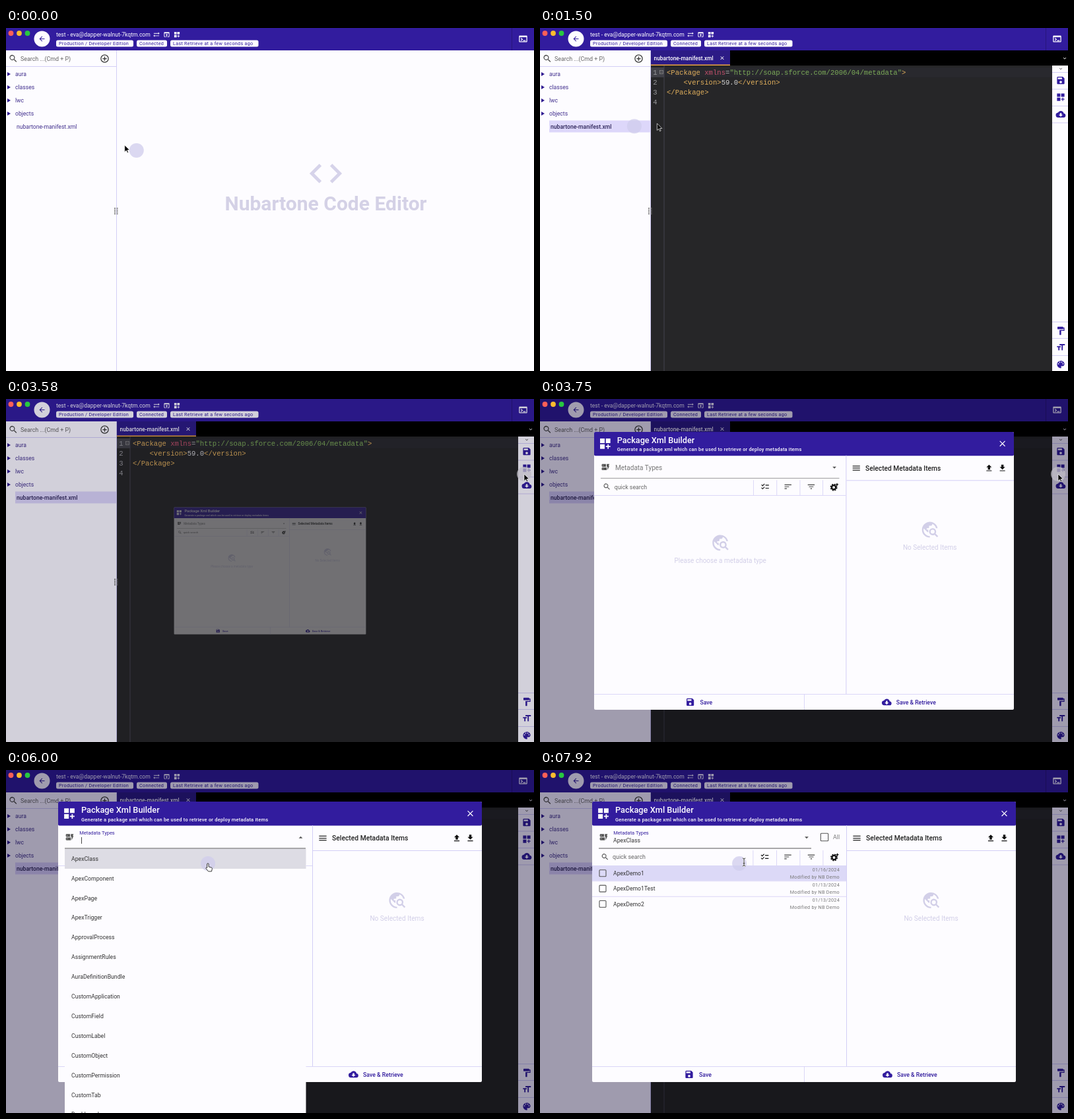
An HTML page for the animation above (8000 ms loop, 800 px wide and 521 px high).

```html
<!DOCTYPE html>
<html lang="en">
<head>
<meta charset="utf-8">
<title>Code editor</title>
<style>
html, body { margin: 0; width: 100%; height: 100%; overflow: hidden; background: #fdfcff; }
svg { display: block; width: 100%; height: 100%; }
text { font-family: Roboto, sans-serif; white-space: pre; }
.mono { font-family: "Liberation Mono", monospace; }
#dim { mix-blend-mode: multiply; }
</style>
</head>
<body>
<svg id="stage" viewBox="0 0 800 521"></svg>
<script>
const PURPLE = '#321c9e', LINE = '#d3cef6', PALE = '#d2cfe8', WHITE = '#fdfcff';

const ICONS = {
  back: 'M20 11H7.83l5.59-5.59L12 4l-8 8 8 8 1.41-1.41L7.83 13H20z',
  swap: 'M22 8l-4-4v3H3v2h15v3zM2 16l4 4v-3h15v-2H6v-3z',
  open: 'M19 4H5c-1.1 0-2 .9-2 2v12c0 1.1.9 2 2 2h4v-2H5V8h14v10h-4v2h4c1.1 0 2-.9 2-2V6c0-1.1-.9-2-2-2zm-7 6l-4 4h3v6h2v-6h3z',
  widgets: 'M3 11h8V3H3zM3 21h8v-8H3zM13 3v8h8V3zM18 13h-2v3h-3v2h3v3h2v-3h3v-2h-3z',
  term: 'M20 4H4c-1.1 0-2 .9-2 2v12c0 1.1.9 2 2 2h16c1.1 0 2-.9 2-2V6c0-1.1-.9-2-2-2zm0 14H4V8h16zm-2-1h-6v-2h6zM7.5 17l-1.4-1.4L8.7 13l-2.6-2.6L7.5 9l4 4z',
  search: 'M15.5 14h-.8l-.3-.3A6.5 6.5 0 1 0 13.7 14.4l.3.3v.8l5 5 1.5-1.5zm-6 0a4.5 4.5 0 1 1 0-9 4.5 4.5 0 0 1 0 9z',
  add: 'M13 7h-2v4H7v2h4v4h2v-4h4v-2h-4zM12 2a10 10 0 1 0 0 20 10 10 0 0 0 0-20zm0 18a8 8 0 1 1 0-16 8 8 0 0 1 0 16z',
  code: 'M9.4 16.6L4.8 12l4.6-4.6L8 6l-6 6 6 6zm5.2 0l4.6-4.6-4.6-4.6L16 6l6 6-6 6z',
  save: 'M17 3H5a2 2 0 0 0-2 2v14c0 1.1.9 2 2 2h14c1.1 0 2-.9 2-2V7zm-5 16a3 3 0 1 1 0-6 3 3 0 0 1 0 6zm3-10H5V5h10z',
  cloud: 'M19.35 10.04A7.5 7.5 0 0 0 5.35 8.04 6 6 0 0 0 6 20h13a5 5 0 0 0 .35-9.96zM17 13l-5 5-5-5h3V9h4v4z',
  paint: 'M18 4V3c0-.5-.5-1-1-1H5c-.5 0-1 .5-1 1v4c0 .5.5 1 1 1h12c.5 0 1-.5 1-1V6h1v4H9v11c0 .5.5 1 1 1h2c.5 0 1-.5 1-1v-9h8V4z',
  size: 'M9 4v3h5v12h3V7h5V4zm-6 8h3v7h3v-7h3V9H3z',
  palette: 'M12 3a9 9 0 0 0 0 18c.8 0 1.5-.7 1.5-1.5 0-1-.8-1.2-.8-2 0-.8.7-1.5 1.5-1.5H16c2.8 0 5-2.2 5-5 0-4.4-4-8-9-8zM6.5 12a1.5 1.5 0 1 1 0-3 1.5 1.5 0 0 1 0 3zm3-4a1.5 1.5 0 1 1 0-3 1.5 1.5 0 0 1 0 3zm5 0a1.5 1.5 0 1 1 0-3 1.5 1.5 0 0 1 0 3zm3 4a1.5 1.5 0 1 1 0-3 1.5 1.5 0 0 1 0 3z',
  check: 'M22 7h-9v2h9zm0 8h-9v2h9zM5.5 11L2 7.5 3.4 6l2.1 2.2 4.3-4.3 1.4 1.4zm0 8L2 15.5 3.4 14l2.1 2.2 4.3-4.3 1.4 1.4z',
  sort: 'M3 18h6v-2H3zM3 6v2h18V6zm0 7h12v-2H3z',
  filter: 'M10 18h4v-2h-4zM3 6v2h18V6zm3 7h12v-2H6z',
  menu: 'M3 18h18v-2H3zm0-5h18v-2H3zm0-7v2h18V6z',
  close: 'M19 6.4L17.6 5 12 10.6 6.4 5 5 6.4l5.6 5.6L5 17.6 6.4 19l5.6-5.6 5.6 5.6 1.4-1.4-5.6-5.6z',
  up: 'M5 20h14v-2H5zM5 10h4v6h6v-6h4l-7-7z',
  down: 'M19 9h-4V3H9v6H5l7 7zM5 18v2h14v-2z',
  drop: 'M7 10l5 5 5-5z',
  rise: 'M7 14l5-5 5 5z',
  chevron: 'M16.6 8.6L12 13.2 7.4 8.6 6 10l6 6 6-6z',
  form: 'M17 20v-9h-2V4h7l-2 5h2zm-2-7v7H4c-1.1 0-2-.9-2-2v-3c0-1.1.9-2 2-2zm-8.7 2.7H4.7v1.6h1.6zM13 4v7H4c-1.1 0-2-.9-2-2V6c0-1.1.9-2 2-2zM6.3 6.7H4.7v1.6h1.6z',
  globe: 'M19.3 16.9a4.5 4.5 0 1 0-1.4 1.4l3.2 3.2 1.4-1.4zm-3.8.1a2.5 2.5 0 1 1 0-5 2.5 2.5 0 0 1 0 5zM12 20v2A10 10 0 1 1 21.8 10h-2.1A8 8 0 0 0 15 4.6V5c0 1.1-.9 2-2 2h-2v2c0 .5-.5 1-1 1H8v2h2v3H9l-4.8-4.8A8 8 0 0 0 12 20z'
};

// All of these centre vertically on y
const text = (x, y, s, size, fill, more = '') =>
  `<text x="${x}" y="${y + size * .36}" font-size="${size}" fill="${fill}" ${more}>${s}</text>`;
const icon = (name, x, y, size, fill) =>
  `<path d="${ICONS[name]}" fill="${fill}" fill-rule="evenodd" transform="translate(${x - size / 2} ${y - size / 2}) scale(${size / 24})"/>`;
const rect = (x, y, w, h, fill, more = '') =>
  `<rect x="${x}" y="${y}" width="${w}" height="${h}" fill="${fill}" ${more}/>`;
const group = (id, body) => `<g id="${id}">${body}</g>`;
const each = (list, fn) => list.map(fn).join('');
const MID = 'text-anchor="middle"', END = 'text-anchor="end"', MEDIUM = 'font-weight="500"';
const SPACED = 'letter-spacing=".3"';

const badge = (x, w, s) => rect(x, 18.5, w, 10, WHITE, 'rx="2.5"') + text(x + 4, 23.5, s, 7.2, PURPLE, SPACED);
const file = 'nubartone-manifest.xml';

const header = rect(0, 0, 800, 34, PURPLE) + `<circle cx="54.5" cy="16.5" r="12" fill="${WHITE}"/>` +
  icon('back', 54.5, 16.5, 12, PURPLE) +
  text(76, 9.7, 'test - eva@dapper-walnut-7kqtrn.com', 8.6, WHITE) +
  each([['swap', 228], ['open', 243.5], ['widgets', 259]], ([n, x]) => icon(n, x, 10, 11, WHITE)) +
  badge(76, 117, 'Production / Developer Edition') + badge(198, 46, 'Connected') +
  badge(249, 133.5, 'Last Retrieve at a few seconds ago') +
  rect(766, 0, 1, 34, '#27157c') + icon('term', 783.5, 16.5, 15, WHITE);

const sidebar = rect(0, 34, 168, 487, WHITE) + icon('search', 11, 46.5, 15, '#444') +
  text(22, 46.7, 'Search ...(Cmd + P)', 8.9, '#666') + icon('add', 149.5, 46.5, 15, '#333') +
  rect(0, 58, 167, 1, LINE) +
  each(['aura', 'classes', 'lwc', 'objects'], (s, i) =>
    `<path d="M2 ${67 + 20 * i}l5 3-5 3z" fill="#311b92"/>` + text(14, 70 + 20 * i, s, 8.6, '#42308e')) +
  group('plain', text(16, 150, file, 8.6, '#42308e')) +
  group('chosen', rect(14, 140.5, 153, 18, '#ddd7fa') + text(16, 150, file, 8.6, '#2d2459', MEDIUM)) +
  rect(167, 34, 1, 487, LINE);

const splitter = each([0, 1, 2, 3], i => rect(164, 273 + 2.8 * i, 2, 1.7, '#777') + rect(167.5, 273 + 2.8 * i, 2, 1.7, '#777'));

const welcome = rect(168, 34, 632, 487, WHITE) + icon('code', 484.5, 221, 59, '#d6d3ea') +
  text(484.5, 266.5, 'Nubartone Code Editor', 30, '#d4d1e6', MID + ' font-weight="600"');

const tag = s => `<tspan fill="#dfae5c">${s}</tspan>`;
const CODE = [
  tag('&lt;Package ') + '<tspan fill="#c4506c">xmlns</tspan><tspan fill="#bbb">=</tspan><tspan fill="#7cab58">"http://soap.sforce.com/2006/04/metadata"</tspan>' + tag('&gt;'),
  '    ' + tag('&lt;version&gt;') + '59.0' + tag('&lt;/version&gt;'),
  tag('&lt;/Package&gt;'), ''
];
const editor = rect(168, 34, 632, 23, '#000') + rect(168, 34, 120, 23, '#2c1b86') + rect(168, 55.5, 120, 1.7, '#eda63c') +
  text(172.5, 45.8, file, 8.4, '#fff', MEDIUM) + icon('close', 276, 45.5, 9, '#fff') + icon('chevron', 795, 46, 9, '#fff') +
  rect(168, 57, 608, 464, '#262628') +
  group('active', rect(168, 60, 20, 14.8, '#414148') + rect(188, 60, 588, 14.8, '#29292e')) +
  rect(187.5, 57, 1, 464, '#42424e') +
  each(CODE, (s, i) => text(177.5, 67.3 + 14.8 * i, i + 1, 10.6, '#98989c', 'class="mono" text-anchor="end"') +
    text(192, 67.3 + 14.8 * i, s, 10.6, '#d0d0d0', 'class="mono"')) +
  rect(181.5, 64.5, 5, 5, 'none', 'stroke="#888" stroke-width=".8"') + rect(182.5, 66.7, 3, .7, '#888') +
  rect(776, 57, 24, 464, WHITE) + icon('chevron', 789, 62, 8, '#333') +
  each([67, 92.5, 118, 143.5, 446, 471, 497], y => rect(776, y, 24, 1, LINE)) +
  each([['save', 79.5], ['widgets', 105], ['cloud', 131], ['paint', 460], ['size', 485], ['palette', 511]],
    ([n, y]) => icon(n, 789, y, 15, PURPLE));

const box = (x, y, r) => rect(x - r, y - r, 2 * r, 2 * r, 'none', 'rx="1" stroke="#555" stroke-width="1.1"');
const nothing = (x, y, s) => icon('globe', x, y, 29, PALE) + text(x, y + 27.5, s, 10.1, PALE, MID);
const TYPES = ['ApexClass', 'ApexComponent', 'ApexPage', 'ApexTrigger', 'ApprovalProcess', 'AssignmentRules',
  'AuraDefinitionBundle', 'CustomApplication', 'CustomField', 'CustomLabel', 'CustomObject', 'CustomPermission',
  'CustomTab', 'Dashboard'];

const list = each([['ApexDemo1', 16], ['ApexDemo1Test', 13], ['ApexDemo2', 13]], ([s, day], i) => {
  const y = 145 + 23.4 * i;
  return (i ? rect(79, y, 385, .8, LINE) : group('rowHover', rect(79, y, 385, 23, '#dcd9f7'))) +
    box(95, y + 11.7, 5) + text(111, y + 11.7, s, 8.65, '#333') +
    text(454, y + 6, `01/${day}/2024`, 7.2, '#777', END + ' ' + SPACED) +
    text(454, y + 17, 'Modified by NB Demo', 7.2, '#777', END + ' ' + SPACED);
});

const dialog = rect(79, 48, 642, 426, WHITE, 'rx="2"') + rect(79, 48, 642, 36.5, PURPLE, 'rx="2"') +
  icon('widgets', 96, 66, 21, WHITE) + text(114, 60.7, 'Package Xml Builder', 12.8, WHITE, MEDIUM) +
  text(114, 74.8, 'Generate a package xml which can be used to retrieve or deploy metadata items', 7.5, WHITE, MEDIUM + ' letter-spacing=".2"') +
  icon('close', 703.5, 66, 15, WHITE) +
  icon('form', 96.5, 102, 14, '#555') + `<g id="label">${text(0, 0, 'Metadata Types', 10.1, 'currentColor')}</g>` +
  group('picked', text(111, 107.3, 'ApexClass', 8.7, '#333')) +
  group('arrowDown', icon('drop', 0, 102.5, 14, '#555')) + group('arrowUp', icon('rise', 446.5, 102.5, 14, '#555')) +
  rect(89, 118.5, 365, 1, '#888', 'id="under"') +
  group('all', box(431, 102, 5.7) + text(444, 102.3, 'All', 8.8, '#777')) +
  icon('search', 98.5, 132, 13, '#555') + text(110, 132.2, 'quick search', 8.87, '#666') +
  each([322.5, 358, 393.5, 428.5], x => rect(x, 122, .8, 23, LINE)) + rect(79, 145, 385, .8, LINE) +
  icon('check', 340.5, 132, 14, '#111') + icon('sort', 375.5, 132, 14, '#444') + icon('filter', 411, 132, 14, '#444') +
  '<circle cx="445.5" cy="133" r="3.1" fill="none" stroke="#111" stroke-width="2.3"/>' +
  '<circle cx="445.5" cy="133" r="4.7" fill="none" stroke="#111" stroke-width="1.6" stroke-dasharray="2.2 1.49"/>' +
  '<path d="M450.5 126l.8 1.8 1.8.8-1.8.8-.8 1.8-.8-1.8-1.8-.8 1.8-.8z" fill="#111"/>' +
  group('choose', nothing(272, 218, 'Please choose a metadata type')) + group('list', list) +
  rect(464, 84, 1, 366, LINE) + rect(465, 122, 256, 1, LINE) +
  icon('menu', 480, 103.5, 15, '#222') + text(494, 103.7, 'Selected Metadata Items', 10.3, '#222', MEDIUM) +
  icon('up', 683, 103.5, 14, '#111') + icon('down', 703.5, 103.5, 14, '#111') + nothing(592.5, 198, 'No Selected Items') +
  rect(79, 450, 642, .8, LINE) + rect(400, 450, .8, 24, LINE) +
  icon('save', 226, 462.3, 15, PURPLE) + text(241, 462.5, 'Save', 8.74, PURPLE, MEDIUM) +
  icon('cloud', 526.5, 462.3, 15, PURPLE) + text(541, 462.5, 'Save &amp; Retrieve', 8.74, PURPLE, MEDIUM) +
  group('menu', rect(89, 120, 365.5, 401, WHITE) + group('itemHover', rect(89, 120, 365.5, 30, '#dddce4')) +
    each(TYPES, (s, i) => text(99, 134.6 + 29.9 * i, s, 8.7, '#333'))) +
  rect(114, 102, .9, 10, '#333', 'id="caret"');

const lights = each(['#ff5f57', '#febc2e', '#28c840'], (c, i) => `<circle cx="${7.5 + 12.5 * i}" cy="8" r="3.9" fill="${c}"/>`);

const beam = 'M-2.2-6Q0-6 0-4.4Q0-6 2.2-6M0-4.4V4.4M-2.2 6Q0 6 0 4.4Q0 6 2.2 6M-1.3 1.8H1.3';
const pointers = '<circle id="halo" r="11"/>' +
  '<g id="cursor" stroke-linejoin="round"><path id="arrow" d="M0 0v10.5l2.5-2.3 1.7 3.6 1.6-.7-1.6-3.5h3.4z" fill="#000" stroke="#fff" stroke-width=".7"/>' +
  '<path id="hand" d="M-1.3 1c0-1.6 2.4-1.6 2.4 0v4l4.2 1.2c1 .3 1.2 1 1 2l-.8 3.8h-5l-3.6-4.6c-.4-.9.8-1.6 1.8-.6z" fill="#fff" stroke="#222" stroke-width=".9"/>' +
  `<g id="beam" fill="none"><path d="${beam}" stroke="#fff" stroke-width="2.4"/><path d="${beam}" stroke="#222" stroke-width=".9"/></g></g>`;

document.getElementById('stage').innerHTML = rect(0, 0, 800, 521, WHITE) + header + sidebar +
  group('welcome', welcome) + group('editor', editor) + splitter +
  group('tip', rect(675, 94, 92, 23, '#666', 'rx="2"') + text(721, 105.5, 'Package Xml Builder', 8.5, '#fff', MID)) +
  rect(0, 0, 800, 521, '#a09dae', 'id="dim"') + group('dialog', dialog) + lights + pointers;

const $ = Object.fromEntries([...document.querySelectorAll('[id]')].map(e => [e.id, e]));
const show = (id, on) => $[id].setAttribute('opacity', +on);
const move = (id, x, y, s = 1) => $[id].setAttribute('transform', `translate(${x} ${y}) scale(${s})`);
const ramp = (t, start, length) => Math.min(1, Math.max(0, (t - start) / length));
const easeOut = p => 1 - (1 - p) ** 3;

// Pointer path: time, x, y
const PATH = [
  [-70, 198, 186], [0, 180, 178], [200, 125, 160], [420, 103, 154], [1350, 103, 154], [1750, 300, 130],
  [2050, 439, 100], [2200, 439, 100], [2340, 764, 123], [2440, 764, 123], [2650, 783, 112], [2900, 785, 114],
  [3900, 785, 114], [4150, 560, 118], [4310, 380, 110], [4430, 368, 108], [5700, 368, 108], [5900, 306, 142],
  [6800, 306, 142], [7100, 300, 160], [7640, 298, 158], [7850, 302, 142], [7920, 309, 140], [8000, 315, 138]
];
function pointerAt(t) {
  const i = Math.max(1, PATH.findIndex(k => k[0] >= t));
  const [a, b] = [PATH[i - 1], PATH[i]], p = ramp(t, a[0], b[0] - a[0]);
  return [a[1] + (b[1] - a[1]) * p, a[2] + (b[2] - a[2]) * p];
}
const CLICKS = [720, 3540, 4640, 6250];

function pointerShape(t, x, y) {
  if (t < 1500) return x < 115 ? 'hand' : 'arrow';
  if (t < 3530) return x > 776 ? 'hand' : x > 188 ? 'beam' : 'arrow';
  if (t < 4250) return 'arrow';
  if (t < 6500) return y > 120 ? 'hand' : 'beam';
  return y > 145 ? 'hand' : 'beam';
}

function draw(t) {
  const opened = t >= 750, focus = t >= 4580, picked = t >= 6250, loaded = t >= 6580;
  show('plain', !opened);
  show('chosen', opened);
  show('welcome', !opened);
  show('editor', opened);
  move('active', 0, t < 1000 ? 14.8 : 0);
  show('tip', t < 3530 ? ramp(t, 2950, 130) : 0);

  const grow = ramp(t, 3530, 280), s = easeOut(grow);
  show('dim', s);
  show('dialog', Math.min(1, grow * 2));
  move('dialog', 400 * (1 - s), 261 * (1 - s), s);

  const float = easeOut(ramp(t, 4580, 200));
  move('label', 111.3, 103 - 7.5 * float, 1 - .257 * float);
  $.label.setAttribute('color', focus ? PURPLE : '#777');
  const menu = ramp(t, 4670, 260) * (1 - ramp(t, 6250, 250));
  show('menu', menu);
  show('itemHover', t >= 5830);
  show('arrowUp', focus && !picked);
  show('arrowDown', !focus || picked);
  move('arrowDown', loaded ? 404 : 446.5, 0);
  $.under.setAttribute('width', loaded ? 322 : 365);
  $.under.setAttribute('fill', t > 4400 ? '#555' : '#999');
  show('picked', picked);
  show('all', loaded);
  show('choose', !loaded);
  show('list', loaded);
  show('rowHover', ramp(t, 6860, 120));
  const blink = picked ? (t - 6670) / 500 & 1 : !((t - 4580) / 500 & 1);
  show('caret', focus && blink);

  const [x, y] = pointerAt(t), shape = pointerShape(t, x, y);
  move('cursor', x, y);
  for (const id of ['arrow', 'hand', 'beam']) show(id, id === shape);

  // The halo trails the pointer and all but vanishes over the dark editor
  const [hx, hy] = pointerAt(t - 70);
  const onDark = opened && t < 3530 && hx > 168 && hx < 776;
  const pressed = CLICKS.some(c => t >= c && t < c + 300);
  move('halo', hx, hy);
  $.halo.setAttribute('fill', pressed ? '#bfbcc6' : '#cfccec');
  show('halo', onDark ? .06 : .75);
}

function frame(now) {
  draw(now % 8000);
  requestAnimationFrame(frame);
}
requestAnimationFrame(frame);
</script>
</body>
</html>
```
